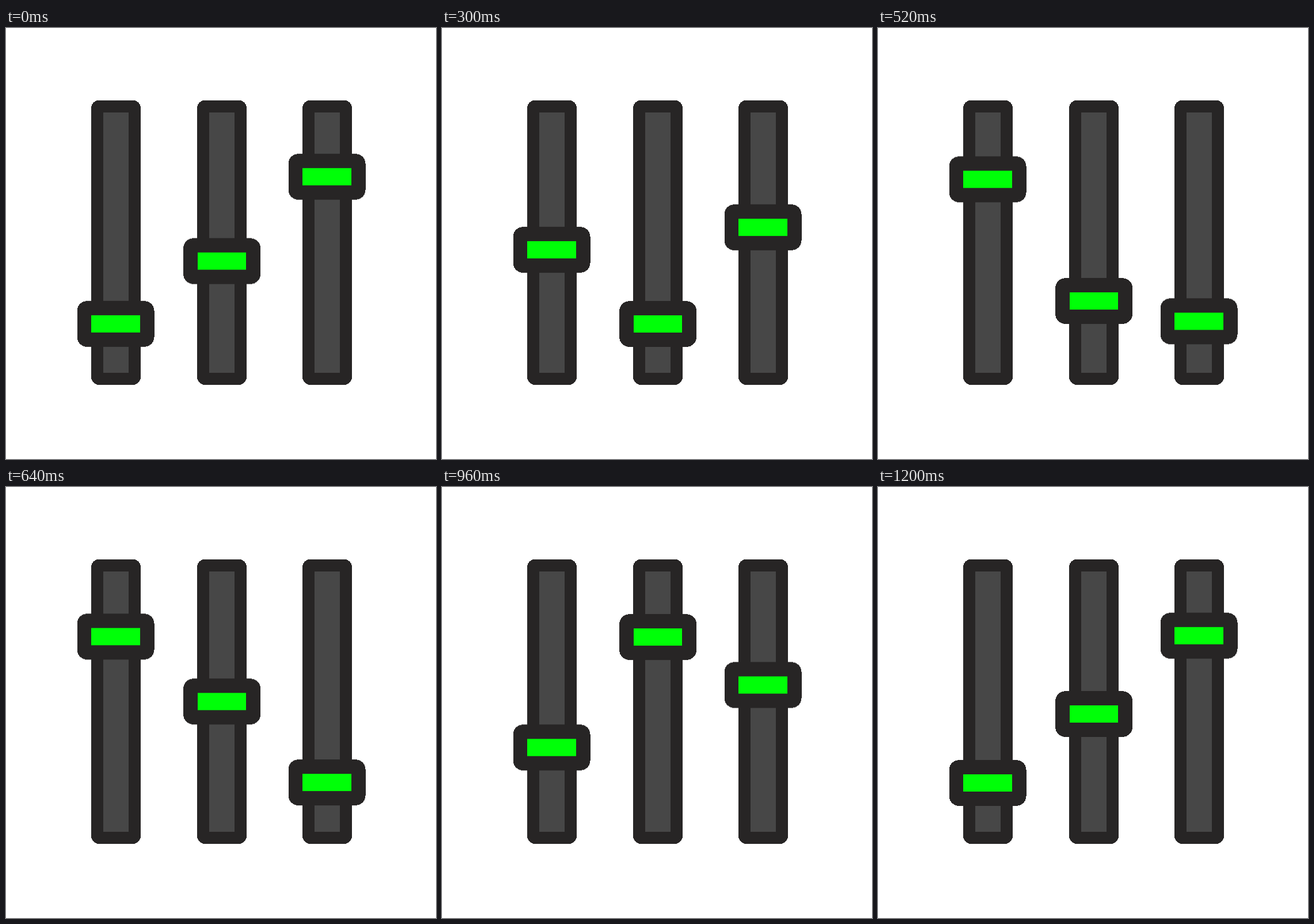
An HTML page that plays this animation: 747x750 px, repeating every 1220 ms.

```html
<!DOCTYPE html>
<html lang="en">
<head>
<meta charset="utf-8">
<title>Sliders</title>
<style>
  html, body { margin: 0; width: 100%; height: 100%; overflow: hidden; background: #fff; }
  svg { display: block; width: 747px; height: 750px; shape-rendering: crispEdges; }
  .edge { fill: #272525; }
  .groove { fill: #474747; }
  .light { fill: #00ff08; }

  .left { animation: left 1220ms cubic-bezier(.667, 0, .333, 1) infinite; }
  .middle { animation: middle 1220ms linear infinite; }
  .right { animation: right 1220ms cubic-bezier(.78, 0, .36, 1) infinite; }

  /* 1200 ms of motion, then a 20 ms rest before the loop */
  @keyframes left {
    0%, 98.3607%, 100% { transform: translateY(500px); }
    49.1803% { transform: translateY(244.4px); }
  }
  @keyframes middle {
    0% { transform: translateY(380px); animation-timing-function: cubic-bezier(.167, .167, .167, 1); }
    24.5902% { transform: translateY(500px); animation-timing-function: cubic-bezier(.69, 0, .44, 1); }
    73.7705% { transform: translateY(243.5px); animation-timing-function: cubic-bezier(.833, 0, .833, .833); }
    98.3607%, 100% { transform: translateY(380px); }
  }
  @keyframes right {
    0%, 98.3607%, 100% { transform: translateY(243.7px); }
    49.1803% { transform: translateY(499.8px); }
  }
</style>
</head>
<body>
<svg viewBox="0 0 747 750">
  <defs>
    <g id="track">
      <rect class="edge" y="125.6" width="86" height="495.4" rx="14"/>
      <rect class="groove" x="21" y="147" width="44" height="453"/>
    </g>
    <g id="knob">
      <rect class="edge" x="-24.5" y="-24.7" width="134" height="79.5" rx="17"/>
      <rect class="light" width="84.6" height="30"/>
    </g>
  </defs>
  <use href="#track" x="148"/>
  <use href="#track" x="332"/>
  <use href="#track" x="515"/>
  <g class="left"><use href="#knob" x="148"/></g>
  <g class="middle"><use href="#knob" x="332.6"/></g>
  <g class="right"><use href="#knob" x="515"/></g>
</svg>
</body>
</html>
```
